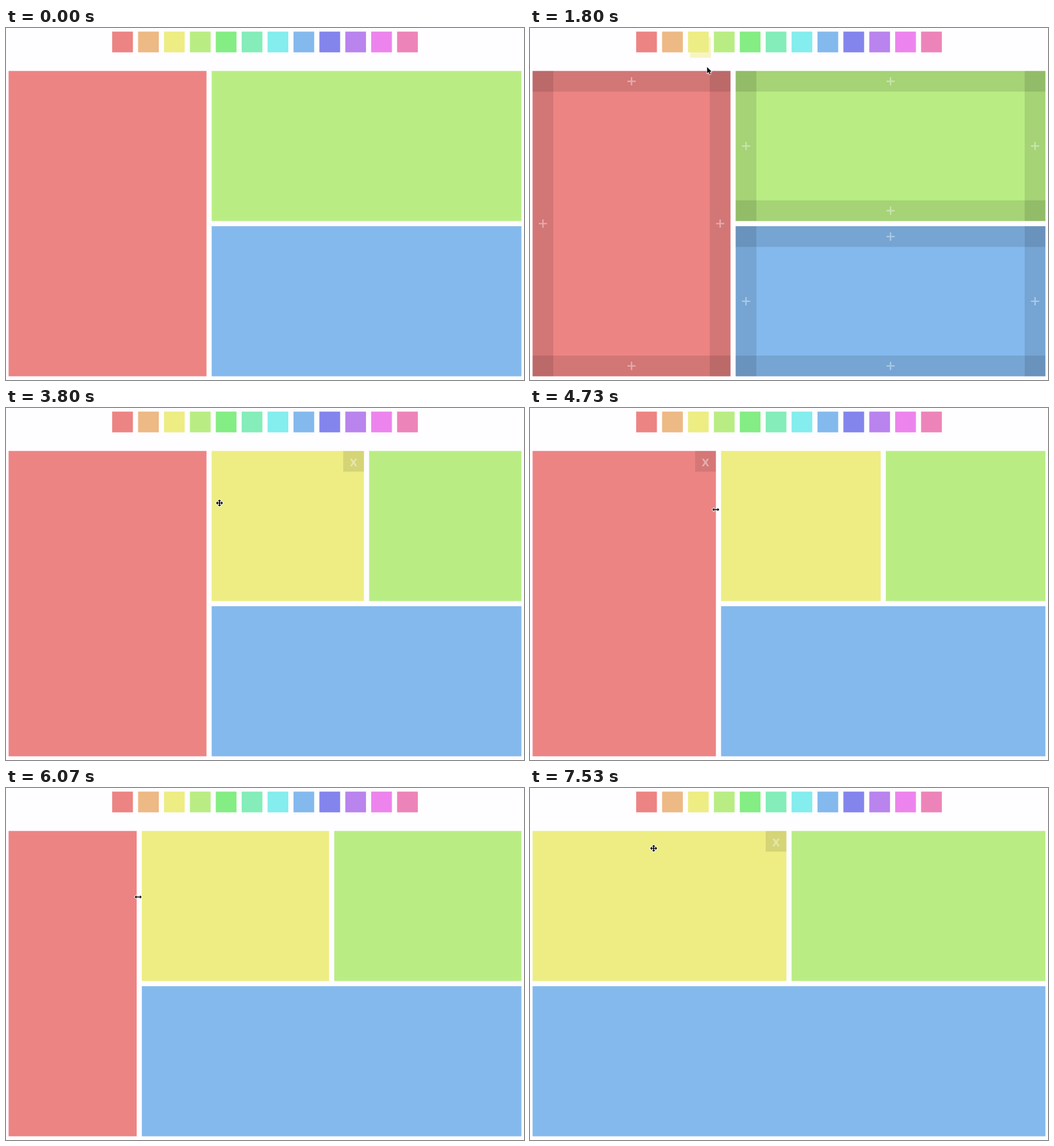
These frames come from a looping animation (888 px wide and 604 px high, 8000 ms). An HTML page:

```html
<!DOCTYPE html>
<html lang="en">
<head>
<meta charset="utf-8">
<title>Tile layout</title>
<style>
html, body { margin: 0; width: 100%; height: 100%; overflow: hidden; background: #fefdff; }
svg { display: block; width: 888px; height: 604px; }
text { font: 700 17px "DejaVu Sans", sans-serif; text-anchor: middle; }
</style>
</head>
<body>
<svg id="stage" viewBox="0 0 888 604">
  <defs>
    <radialGradient id="badge" cx=".5" cy=".3" r=".75">
      <stop offset="0" stop-color="#4db53a"/>
      <stop offset="1" stop-color="#16800c"/>
    </radialGradient>
  </defs>
  <g id="scene"></g>
</svg>
<script>
const LOOP = 8000, STEP = 200 / 3;
const S = 0.888;              // layout units to pixels
const SIZE = 40 * S;          // swatch, drop zone and close button
const GAP = 10 * S;
const LEFT = 5 * S, RIGHT = 995 * S, TOP = 83 * S, BOTTOM = 673 * S;
const RED = 0, YELLOW = 2, GREEN = 3, BLUE = 7;

const DRAG = 1667, DROP = 2930, RESIZE = 4533, RESIZED = 5600, REMOVE = 7460;

// The pointer rests between moves.
const ENTRY = { x: 672, y: -20 };
const MOVES = [
  { from: 600, to: 1067, x: 287, y: 22 },
  { from: DRAG, to: 1800, x: 303, y: 66 },
  { from: 1800, to: 2667, x: 372, y: 160 },
  { from: 2867, to: 3067, x: 366, y: 163 },
  { from: 3800, to: 4067, x: 346.3, y: 172 },
  { from: RESIZE, to: 5133, x: 263, y: 179 },
  { from: 5133, to: 5533, x: 226.6, y: 187 },
  { from: 6200, to: 6800, x: 212, y: 103.5 }
];

const clamp = (v, lo, hi) => Math.min(Math.max(v, lo), hi);

function pointer(t) {
  let { x, y } = ENTRY;
  for (const m of MOVES) {
    const k = clamp((t - m.from) / (m.to - m.from), 0, 1);
    x += (m.x - x) * k;
    y += (m.y - y) * k;
  }
  return { x, y };
}

const color = i => `hsl(${30 * i}, 75%, 72.5%)`;

const rect = (x, y, w, h, fill, alpha = 1) =>
  `<rect x="${x}" y="${y}" width="${w}" height="${h}" fill="${fill}" fill-opacity="${alpha}"/>`;

const plus = (x, y, r, width, alpha) =>
  `<path d="M${x - r} ${y}h${2 * r}M${x} ${y - r}v${2 * r}" stroke="#fff" stroke-width="${width}" stroke-opacity="${alpha}"/>`;

const inside = (b, p) =>
  p.x >= b.x && p.x <= b.x + b.w + 1 && p.y >= b.y && p.y <= b.y + b.h;

const tile = (hue, x1, y1, x2, y2) => ({ hue, x: x1, y: y1, w: x2 - x1, h: y2 - y1 });

// The divider trails the pointer slightly while it is pulled.
const divider = t => pointer(clamp(t - 20, RESIZE, RESIZED)).x - 2.6;

function layout(t) {
  const removed = t >= REMOVE;
  const edge = removed ? LEFT - GAP : divider(t);
  const x = edge + GAP, midX = (x + RIGHT) / 2, midY = (TOP + BOTTOM) / 2;
  const rowEnd = midY - GAP / 2;
  const tiles = removed ? [] : [tile(RED, LEFT, TOP, edge, BOTTOM)];
  if (t < DROP) {
    tiles.push(tile(GREEN, x, TOP, RIGHT, rowEnd));
  } else {
    tiles.push(tile(YELLOW, x, TOP, midX - GAP / 2, rowEnd));
    tiles.push(tile(GREEN, midX + GAP / 2, TOP, RIGHT, rowEnd));
  }
  tiles.push(tile(BLUE, x, midY + GAP / 2, RIGHT, BOTTOM));
  return tiles;
}

function zonesOf({ x, y, w, h }) {
  return [
    { x, y, w, h: SIZE },
    { x, y: y + h - SIZE, w, h: SIZE },
    { x, y, w: SIZE, h },
    { x: x + w - SIZE, y, w: SIZE, h }
  ];
}

function drawZone(z, on) {
  return rect(z.x, z.y, z.w, z.h, '#000', on ? 0.2 : 0.11) +
    plus(z.x + z.w / 2, z.y + z.h / 2, 7.1, 2.4, on ? 0.9 : 0.4);
}

function drawGhost(t) {
  const p = pointer(t - 105);
  const alpha = Math.min((t - DRAG) / 267, 0.87);
  return rect(p.x - 16, p.y - 15.8, SIZE, SIZE, color(YELLOW), alpha);
}

function drawClose(b, p) {
  const box = { x: b.x + b.w - SIZE, y: b.y, w: SIZE, h: SIZE };
  const on = inside(box, p);
  return rect(box.x, box.y, SIZE, SIZE, '#000', on ? 0.2 : 0.1) +
    `<text x="${box.x + SIZE / 2}" y="${box.y + 25.8}" fill="#fff" fill-opacity="${on ? 0.9 : 0.4}">X</text>`;
}

const DOUBLE = '<path d="M-6 0L-3 -2.9V-.8H3V-2.9L6 0L3 2.9V.8H-3V2.9Z"/>';
const CURSORS = {
  arrow: '<path d="M.6 1V12L3.2 9.6L5 13.6L6.7 12.8L5 9H8.4Z"/>',
  resize: DOUBLE,
  move: DOUBLE + `<g transform="rotate(90)">${DOUBLE}</g>`
};

function drawCursor(kind, { x, y }) {
  const shape = CURSORS[kind];
  return `<g transform="translate(${x} ${y})">` +
    `<g fill="#fff" stroke="#fff" stroke-width="1.8" stroke-linejoin="round">${shape}</g>${shape}</g>`;
}

function drawBadge({ x, y }) {
  return `<circle cx="${x + 8}" cy="${y + 20}" r="8.5" fill="url(#badge)"/>` +
    plus(x + 8, y + 20, 4.4, 2, 1);
}

function scene(t) {
  const p = pointer(t);
  const tiles = layout(t);
  const dragging = t >= DRAG && t < DROP;
  const resizing = t >= RESIZE && t < RESIZED;
  const hover = t >= DROP && tiles.find(b => inside(b, p));

  let out = rect(0, 0, 888, 604, '#fefdff');
  for (let i = 0; i < 12; i++) out += rect((205 + 50 * i) * S, 7 * S, SIZE, SIZE, color(i));
  for (const b of tiles) out += rect(b.x, b.y, b.w, b.h, color(b.hue));

  let target;
  if (dragging) {
    const zones = tiles.flatMap(zonesOf);
    target = zones.filter(z => inside(z, p)).pop();
    out += zones.map(z => drawZone(z, z === target)).join('') + drawGhost(t);
  }
  if (hover) out += drawClose(hover, p);

  const kind = t < DROP ? 'arrow' : hover && !resizing ? 'move' : 'resize';
  out += drawCursor(kind, p);
  if (target) out += drawBadge(p);
  return out;
}

const root = document.getElementById('scene');
let shown = -1;

function tick(now) {
  const step = Math.floor((now % LOOP + 4) / STEP);
  if (step !== shown) {
    shown = step;
    root.innerHTML = scene(step * STEP);
  }
  requestAnimationFrame(tick);
}
tick(0);
</script>
</body>
</html>
```
